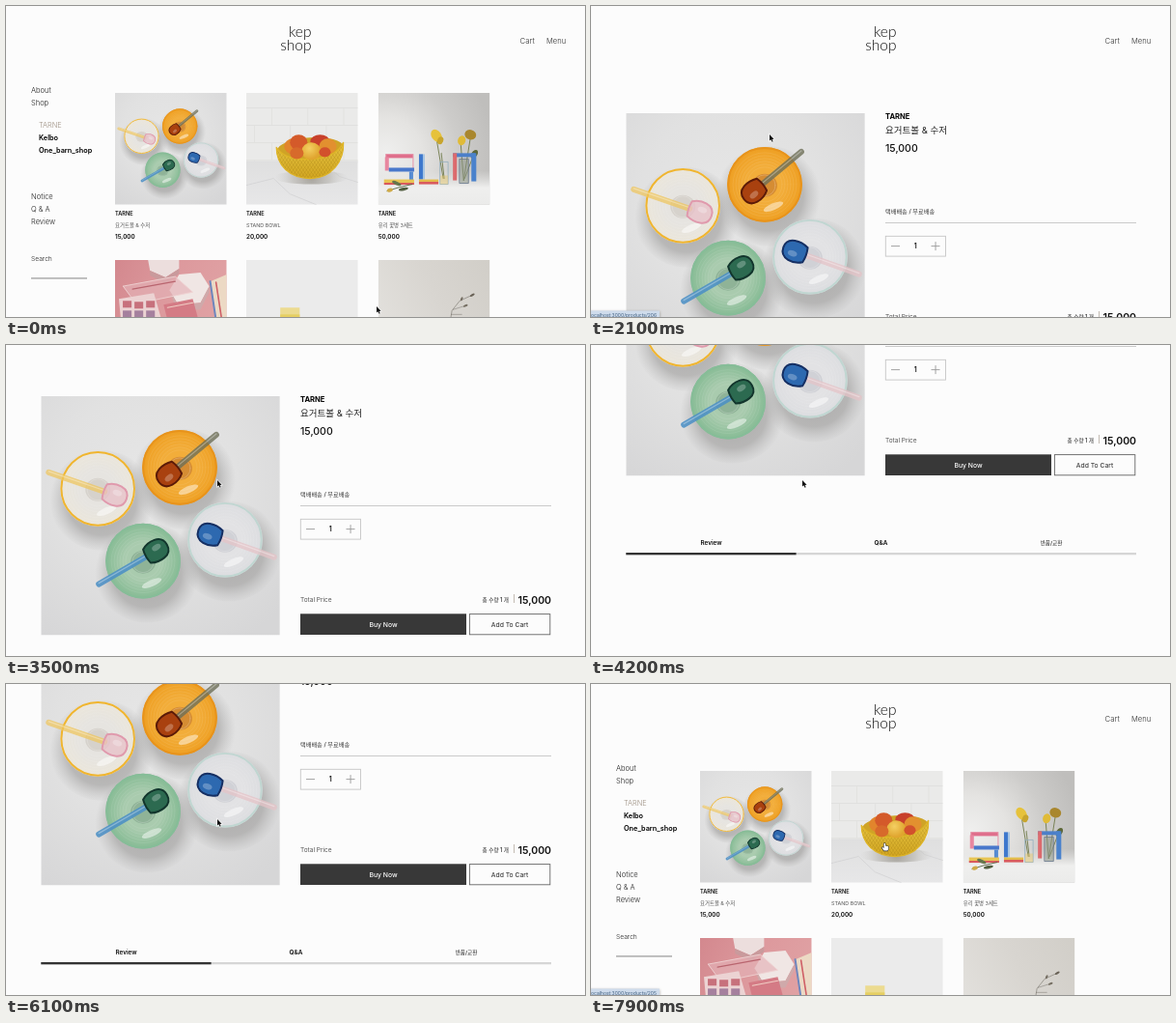
An HTML page with a canvas for the animation above (8000 ms loop, 600 px wide and 322 px high).

```html
<!DOCTYPE html>
<html lang="ko">
<head>
<meta charset="utf-8">
<title>Shop</title>
<style>
html, body { margin: 0; width: 100%; height: 100%; overflow: hidden; background: #fcfcfc; }
canvas { display: block; width: 100vw; height: 100vh; }
</style>
</head>
<body>
<canvas id="stage"></canvas>
<script>
const W = 600, H = 322, LOOP = 8000, STEP = 100;
const OPEN = 1700, BACK = 7400, END = 560;
const BRAND = 'TARNE';
const FONT = 'Inter, "Noto Sans CJK KR", "Noto Sans CJK", sans-serif';
const canvas = document.getElementById('stage');
const c = canvas.getContext('2d');

// Each key is a time followed by values.
const scrollKeys = [[2800, 0], [3100, 24], [3400, 57], [3700, 60], [3900, 92],
  [4200, 223], [4500, 430], [4700, 535], [4900, 557], [5200, END],
  [5500, END], [5800, 390], [6100, 150], [6300, 40], [6400, 12], [6600, 0]];
const cursorKeys = [[400, 384, 311], [1200, 185, 133], [2200, 185, 133],
  [2900, 219, 140], [7500, 219, 140], [7800, 304.5, 165]];

function sample(keys, t, i, ease = k => k) {
  if (t <= keys[0][0]) return keys[0][i];
  for (let n = 1; n < keys.length; n++) {
    const a = keys[n - 1], b = keys[n];
    if (t <= b[0]) return a[i] + (b[i] - a[i]) * ease((t - a[0]) / (b[0] - a[0]));
  }
  return keys[keys.length - 1][i];
}
const smooth = k => k * k * (3 - 2 * k);

function text(s, x, y, size, weight = 400, color = '#111', align = 'left', family = FONT) {
  c.font = `${weight} ${size}px ${family}`;
  c.textAlign = align;
  c.fillStyle = color;
  c.fillText(s, x, y + size * 0.36);
}
function rect(x, y, w, h, color) {
  c.fillStyle = color;
  c.fillRect(x, y, w, h);
}
function frame(x, y, w, h, color, line = 1) {
  c.strokeStyle = color;
  c.lineWidth = line;
  c.strokeRect(x, y, w, h);
}
function path(points, color, line, closed) {
  c.beginPath();
  points.forEach(([x, y]) => c.lineTo(x, y));
  if (closed) c.closePath();
  if (line) {
    c.strokeStyle = color;
    c.lineWidth = line;
    c.stroke();
  } else {
    c.fillStyle = color;
    c.fill();
  }
}
function oval(x, y, rx, ry, color, turn = 0) {
  c.beginPath();
  c.ellipse(x, y, rx, ry, turn, 0, Math.PI * 2);
  c.fillStyle = color;
  c.fill();
}
function ring(x, y, r, color, line) {
  c.beginPath();
  c.arc(x, y, r, 0, Math.PI * 2);
  c.strokeStyle = color;
  c.lineWidth = line;
  c.stroke();
}
function blend(g, colors) {
  colors.forEach((col, i) => g.addColorStop(i / (colors.length - 1), col));
  return g;
}
const shade = (x0, y0, x1, y1, ...colors) =>
  blend(c.createLinearGradient(x0, y0, x1, y1), colors);
const glow = (x, y, r, ...colors) =>
  blend(c.createRadialGradient(x, y, 0, x, y, r), colors);

// Places a picture drawn in a square of `unit` pixels.
function photo(draw, x, y, size, unit) {
  c.save();
  c.beginPath();
  c.rect(x, y, size, size);
  c.clip();
  c.translate(x, y);
  c.scale(size / unit, size / unit);
  c.lineCap = c.lineJoin = 'round';
  draw();
  c.restore();
}

function bowl(x, y, rim, inner, outer, base) {
  oval(x + 4, y + 12, 54, 52,
    glow(x + 4, y + 12, 54, '#a4a3a2cc', '#a4a3a2cc', '#a4a3a2aa', '#b4b4b400'));
  oval(x, y, 39, 39, glow(x, y, 39, inner, inner, outer));
  for (let r = 18; r < 36; r += 3) ring(x, y, r, '#ffffff18', 0.8);
  ring(x, y, 37.9, rim, 2);
  oval(x, y + 1, 13, 12, base);
  ring(x, y + 1, 11, '#ffffff33', 1);
  oval(x + 9, y + 23, 11, 3.5, '#ffffff77', -0.4);
}
function spoon(x0, y0, x1, y1, handle, head, edge) {
  path([[x0, y0], [x1, y1]], handle, 6);
  path([[x0, y0 - 1], [x1, y1 - 1]], '#ffffff50', 1.2);
  c.save();
  c.translate(x1, y1);
  c.rotate(Math.atan2(y1 - y0, x1 - x0));
  c.beginPath();
  c.moveTo(0, -8);
  c.bezierCurveTo(8, -13, 24, -13, 24, 0);
  c.bezierCurveTo(24, 13, 8, 12, 0, 8);
  c.quadraticCurveTo(-2, 0, 0, -8);
  c.fillStyle = head;
  c.fill();
  c.strokeStyle = edge;
  c.lineWidth = 2;
  c.stroke();
  oval(13, -3, 5, 3, '#ffffff40');
  c.restore();
}
function bowls() {
  rect(0, 0, 248, 248, glow(110, 90, 190, '#e6e6e6', '#e1e1e1', '#d6d6d7'));
  bowl(59, 96, '#f0b52f', '#e6e4e0', '#ebe6da', '#d6d2cc');
  bowl(144, 74, '#e8931b', '#f2ad3a', '#ee9f22', '#d58c33');
  bowl(106, 171, '#86bd98', '#a9cbae', '#86bb94', '#8fb397');
  bowl(191, 149, '#c0d6d1', '#e2e2e4', '#dcdde0', '#d0d1d6');
  spoon(8, 79, 66, 99, '#efc65fbb', '#e8bfc8bb', '#e09aad');
  spoon(182, 40, 141, 74, '#6f7058cc', '#a9410f', '#5c1b08');
  spoon(60, 195, 110, 166, '#4c8fc6dd', '#2c6a50', '#12352c');
  spoon(242, 167, 186, 147, '#e6c3c8bb', '#2d69b0', '#152f63');
}

function fruit() {
  rect(0, 0, 115, 72, '#eaeae9');
  for (let y = 15; y < 70; y += 18) {
    rect(0, y, 115, 0.8, '#dededc');
    for (let x = y % 36 > 18 ? 8 : 26; x < 115; x += 37) rect(x, y, 0.8, 18, '#e0e0de');
  }
  rect(0, 70, 115, 45, shade(0, 70, 0, 115, '#dfdfdf', '#e7e7e8'));
  path([[0, 95], [28, 88], [45, 104], [72, 115]], '#d3d3d4', 0.8);
  path([[80, 72], [96, 86], [115, 92]], '#d4d4d5', 0.8);
  oval(67, 87, 38, 7, glow(67, 87, 38, '#8f8b82bb', '#a9a69f77', '#cccccc00'));
  oval(66, 57, 34, 11, '#cfa326', -0.06);
  oval(48, 55, 9, 8, '#e2852c');
  oval(54, 51, 9, 8, '#d45a2a');
  oval(76, 50, 10, 7, '#c8402b');
  oval(84, 55, 9, 8, '#e2902f');
  const body = () => {
    c.beginPath();
    c.moveTo(31, 56);
    c.quadraticCurveTo(40, 70, 67, 68);
    c.quadraticCurveTo(92, 67, 100, 51);
    c.bezierCurveTo(101, 70, 88, 88, 66, 88);
    c.bezierCurveTo(45, 88, 31, 75, 31, 56);
  };
  body();
  c.fillStyle = shade(0, 55, 0, 88, '#e5c23f', '#d3a722');
  c.fill();
  c.save();
  body();
  c.clip();
  for (let x = -20; x < 130; x += 3.4) {
    path([[x, 48], [x + 28, 90]], '#a27d1688', 0.5);
    path([[x + 28, 48], [x, 90]], '#a27d1688', 0.5);
  }
  c.restore();
  body();
  c.strokeStyle = '#dfb526';
  c.lineWidth = 1.2;
  c.stroke();
  oval(67, 60, 10, 9, glow(65, 57, 11, '#f4cf62', '#e0a52f'));
  oval(52, 62, 7, 6, '#d76a2b');
  oval(81, 61, 6, 5, '#d2512c');
}

function vases() {
  rect(0, 0, 115, 115, glow(8, 62, 112, '#efefee', '#e4e3e1', '#cdccca', '#bfbebc'));
  rect(0, 80, 115, 35, shade(0, 80, 0, 115, '#e6e6e500', '#efefee', '#ebebea'));
  [[60, 47, 67, 88], [65, 62, 68, 88], [85, 52, 88, 90], [95, 46, 88, 90], [99, 62, 89, 88]]
    .forEach(([a, b, d, e]) => path([[a, b], [d, e]], '#65703b', 0.8));
  oval(60, 44, 5, 7, '#e6c23b', -0.6);
  oval(64, 49, 3, 4, '#c8a52d', 0.4);
  oval(86, 49, 4, 5, '#e0bb37', 0.3);
  oval(95, 43, 6, 5, '#a9872e', 0.3);
  oval(99, 63, 3, 5, '#5d6738', 0.6);
  // Glass blocks
  rect(8, 63, 28, 4, '#df6f8c');
  frame(8, 63, 28, 15, '#e594a8', 1);
  rect(7, 66, 4, 14, '#e887a0');
  rect(11, 77, 26, 4, '#4978cb');
  rect(32, 81, 4, 9, '#568bd2');
  rect(6, 89, 31, 4, '#e8c453');
  rect(6, 92.5, 31, 2, '#d9575b');
  rect(42, 63, 4, 26, '#3e78cd');
  rect(46, 63, 2, 26, '#a8c5e2');
  rect(42, 89, 20, 3, '#e3bb4b');
  rect(42, 91.5, 20, 2.5, '#d9585b');
  frame(64, 71, 8, 23, '#93aebf', 0.8);
  rect(64, 85, 8, 9, '#e3c36677');
  rect(77, 62, 23, 4, '#4b7fc9');
  rect(77, 62, 4, 28, '#dc6a6d');
  rect(84, 68, 9, 25, '#8d978888');
  frame(84, 68, 9, 25, '#66758a', 0.8);
  rect(96, 62, 5, 29, '#4a82cc');
  path([[9, 101], [22, 97], [35, 94]], '#586545', 0.9);
  oval(19, 93, 5, 1.8, '#66764b', 0.4);
  oval(26, 99, 5, 1.6, '#525e40', -0.2);
  oval(12, 100, 3, 2, '#cfaa47', -0.3);
}

function stationery() {
  rect(0, 0, 115, 115, shade(0, 0, 115, 50, '#d3888e', '#dd999d', '#e0a2a4'));
  path([[34, 0], [66, 0], [66, 9], [52, 18], [36, 11]], '#ecdedd', 0, true);
  path([[36, 11], [52, 18], [66, 9], [66, 14], [52, 24], [36, 16]], '#c99a9c', 0, true);
  path([[56, 31], [66, 15], [88, 13], [97, 27], [88, 44], [65, 46]], '#f0e6e4', 0, true);
  path([[56, 31], [65, 46], [88, 44], [97, 27], [97, 33], [88, 51], [64, 53]], '#cfa9aa', 0, true);
  path([[8, 27], [62, 17], [80, 33], [22, 45]], '#e5b3b7aa', 0, true);
  path([[8, 27], [62, 17], [80, 33], [22, 45]], '#efd2d2', 0.9, true);
  path([[18, 30], [62, 22]], '#b9656f', 1.2);
  path([[4, 40], [40, 34], [48, 62], [6, 62]], '#ecd3d3', 0, true);
  for (let i = 0; i < 3; i++) {
    rect(8 + i * 12, 42 + i % 2, 9, 7, '#c7717c');
    rect(8 + i * 12, 52, 9, 7, '#a5809e');
  }
  path([[50, 46], [80, 40], [86, 62], [54, 62]], '#d47b85', 0, true);
  path([[54, 49], [80, 44]], '#f0cdc4', 1);
  path([[98, 22], [115, 15], [115, 62], [104, 62]], '#ecd9c4', 0, true);
  path([[98, 22], [104, 62]], '#6f86bd', 2);
  path([[104, 23], [110, 62]], '#cf6067', 1.6);
}
function box() {
  rect(0, 0, 115, 115, '#ebebeb');
  rect(35, 49, 20, 40, '#ecdb90');
  rect(35, 56, 20, 40, '#e6cf62');
}
function twig() {
  rect(0, 0, 115, 115, shade(0, 60, 115, 0, '#e2e0dc', '#d8d5d0', '#d1cec8'));
  path([[74, 64], [76, 52], [84, 42], [97, 36]], '#77736c', 0.6);
  path([[77, 51], [90, 47]], '#77736c', 0.5);
  path([[75, 56], [86, 56]], '#77736c', 0.5);
  oval(97, 36, 1.2, 2.6, '#696256', 1.1);
  oval(90, 47, 1.1, 2.4, '#756e62', 1.2);
  oval(86, 40, 1.1, 2.2, '#756e62', 0.4);
}

function header() {
  const logo = 'Lato, Inter, sans-serif';
  text('kep', 316.5, 26.7, 15.5, 300, '#111', 'right', logo);
  text('shop', 316.5, 40.7, 15.5, 300, '#111', 'right', logo);
  text('Cart', 532.5, 36, 7.8, 300, '#333');
  text('Menu', 560, 36, 7.6, 300, '#333');
}

const cards = [
  [113, 90, bowls, 248, '요거트볼 & 수저', '15,000'],
  [249, 90, fruit, 115, 'STAND BOWL', '20,000'],
  [385.7, 90, vases, 115, '유리 꽃병 3세트', '50,000'],
  [113, 263, stationery, 115],
  [249, 263, box, 115],
  [385.7, 263, twig, 115]
];
function listing() {
  header();
  [['About', 87], ['Shop', 100], ['Notice', 197], ['Q & A', 210], ['Review', 223]]
    .forEach(([s, y]) => text(s, 26, y, 7.5, 300, '#222'));
  text(BRAND, 34, 123.5, 7.4, 300, '#9c8f80');
  text('Kelbo', 34, 136, 7.3, 600, '#000');
  text('One_barn_shop', 34, 149, 7.3, 600, '#000');
  text('Search', 26, 261.5, 6.7, 300, '#222');
  rect(26, 281.5, 58, 0.9, '#777');
  for (const [x, y, draw, unit, name, price] of cards) {
    photo(draw, x, y, 115.7, unit);
    if (!name) continue;
    text(BRAND, x, y + 125, 5.6, 600, '#111');
    text(name, x, y + 137, 5.4, 400, '#555');
    text(price, x, y + 149, 6.3, 600, '#111');
  }
}

function detail(scroll) {
  c.save();
  c.translate(0, -scroll);
  header();
  photo(bowls, 36.3, 111, 247.5, 248);
  text(BRAND, 305, 114.5, 7.6, 700, '#000');
  text('요거트볼 & 수저', 305, 129, 9.5, 400, '#222');
  text('15,000', 305, 147.5, 10.5, 500, '#111');
  text('택배배송 / 무료배송', 305, 212.5, 6.2, 500, '#333');
  rect(305, 224, 260, 0.9, '#c4c4c4');
  frame(305.3, 238.3, 62.2, 20.8, '#c6c6c6', 0.9);
  rect(311, 248.2, 9, 0.9, '#999');
  rect(352.5, 248.2, 9, 0.9, '#999');
  rect(356.6, 244.1, 0.9, 9, '#999');
  text('1', 336.3, 248.5, 7, 600, '#111', 'center');
  text('Total Price', 305, 321.5, 6.5, 400, '#555');
  text('총 수량 1 개', 521, 321.5, 5.6, 500, '#222', 'right');
  rect(526, 316, 0.8, 9, '#b5aaa0');
  text('15,000', 565, 322, 10.5, 600, '#111', 'right');
  rect(305, 336.3, 172, 21.7, '#383838');
  text('Buy Now', 391, 347.3, 6.8, 500, '#fff', 'center');
  frame(480.4, 336.6, 83.4, 21.2, '#666', 0.9);
  text('Add To Cart', 522, 347.3, 6.8, 400, '#222', 'center');
  text('Review', 124.5, 427.5, 6.4, 600, '#111', 'center');
  text('Q&A', 300.5, 427.5, 6.4, 600, '#111', 'center');
  text('반품/교환', 477, 427.5, 5.6, 500, '#222', 'center');
  rect(36.3, 438, 528.7, 2.3, '#d6d6d6');
  rect(36.3, 438, 176.3, 2.3, '#333');
  c.translate(0, END);
  footer();
  c.restore();
}

function footer() {
  const links = [['소개', 34], ['이용약관', 54], ['개인정보처리방침', 84],
    ['전자금융거래약관', 134], ['청소년보호정책', 184], ['제휴문의', 229]];
  text('kepshop', 9.5, 244, 5.7, 700);
  links.forEach(([s, x], i) => {
    text(s, x, 244, 5.5, i === 2 ? 700 : 500, '#222');
    if (i) text('|', x - 5.4, 244, 5.5, 500, '#222');
  });
  [553, 569.4, 585.8].forEach(x => oval(x, 244.3, 6.4, 6.4, '#bdbdbd'));
  rect(9.5, 259.4, 582.5, 0.9, '#c8c8c8');
  text('(주) kepshop', 9.5, 270.5, 5.6, 700);
  ['가람시 들구 한별동 구름 빌딩 2층', '사업자번호 987-9876-5432', '대표: 남도을']
    .forEach((s, i) => text(s, 9.5, 283 + i * 12.3, 5.5, 500, '#222'));
}

function status(id) {
  c.save();
  c.shadowColor = '#0005';
  c.shadowBlur = 3;
  rect(-4, 315.5, 75, 10, '#cfdcec');
  c.restore();
  text('localhost:3000/products/' + id, -1.2, 319.8, 5, 400, '#3f5f80');
}

function pointer(x, y, shape, edge, line, fill) {
  c.save();
  c.translate(x, y);
  path(shape, edge, line, true);
  path(shape, fill, 0, true);
  c.restore();
}
const arrow = [[0, 0], [0, 6.6], [1.5, 5.3], [2.6, 7.7], [3.7, 7.2], [2.7, 4.9], [4.6, 4.8]];
const hand = [[-0.9, 0], [0.4, 0], [0.6, 2.5], [3.6, 3.2], [3.8, 5.5], [2.8, 7.6],
  [-0.9, 7.6], [-3, 4.6], [-2.3, 3.9], [-0.9, 4.9]];

function draw(t) {
  const x = sample(cursorKeys, t, 1, smooth), y = sample(cursorKeys, t, 2, smooth);
  const onList = t < OPEN || t >= BACK;
  const over = cards.findIndex(([cx, cy]) =>
    x >= cx && x <= cx + 115.7 && y >= cy && y <= cy + 153);
  const hover = onList && over >= 0;
  rect(0, 0, W, H, '#fcfcfc');
  if (onList) listing();
  else detail(sample(scrollKeys, t, 1));
  if (hover) status(206 - over);
  else if (t >= OPEN && t < 2300) status(206);
  if (hover) pointer(x, y, hand, '#333', 1.1, '#fff');
  else pointer(x, y, arrow, '#fff', 1.2, '#111');
}

function tick(now) {
  const ratio = window.devicePixelRatio || 1;
  const w = Math.round(innerWidth * ratio), h = Math.round(innerHeight * ratio);
  if (canvas.width !== w || canvas.height !== h) {
    canvas.width = w;
    canvas.height = h;
  }
  c.setTransform(w / W, 0, 0, h / H, 0, 0);
  draw(Math.floor((now % LOOP) / STEP) * STEP);
  requestAnimationFrame(tick);
}
requestAnimationFrame(tick);
</script>
</body>
</html>
```
